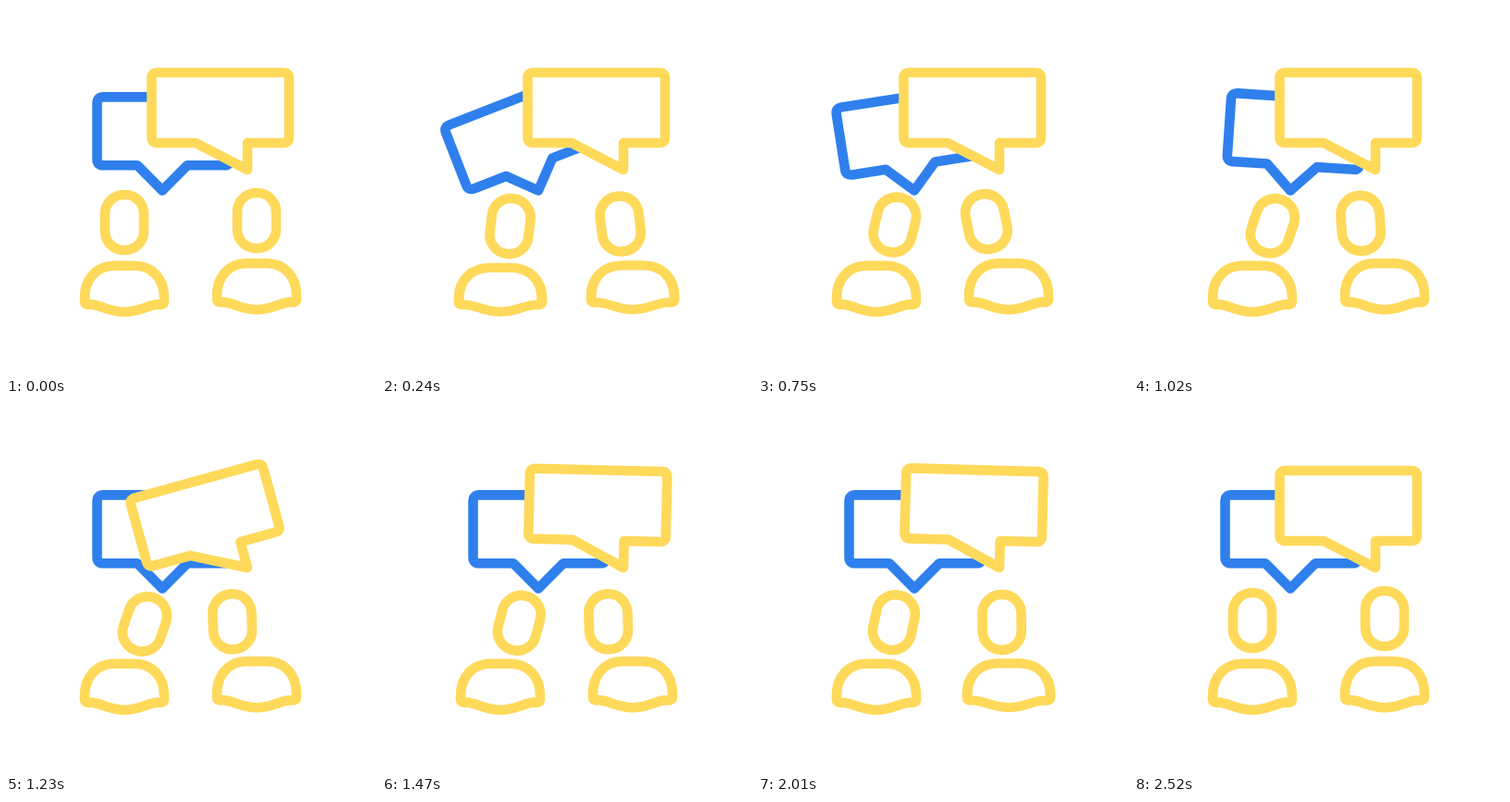
Recreate the animation shown at these times as an HTML page. Size 400x400 px, loop 5550 ms.

```html
<!DOCTYPE html>
<html lang="en">
<head>
<meta charset="utf-8">
<title>Conversation</title>
<style>
  html, body { margin: 0; width: 100%; height: 100%; overflow: hidden; background: #fff; }
  svg { display: block; width: 100%; height: 100%; }
  .line { fill: none; stroke: #ffd95a; stroke-width: 10.6; stroke-linejoin: round; stroke-linecap: round; }
  .filled { fill: #fff; }
  .blue { stroke: #2f80ed; }
</style>
</head>
<body>
<svg viewBox="0 0 400 400">
  <defs>
    <rect id="head" x="-21" y="-30" width="42" height="60" rx="20.5"/>
    <path id="body" d="M-43 -11 V-14 C-43 -35 -30 -49 -11 -49 H11 C30 -49 43 -35 43 -14 V-11 Q43 -6 38 -7 C27 -8 18 1 0 1 C-18 1 -27 -8 -38 -7 Q-43 -6 -43 -11 Z"/>
  </defs>
  <path id="blue" class="line filled blue" d="M105.5 98.4 H235 Q242 98.4 242 105 V166 Q242 172.3 236 172.3 H196 L169 199.5 L142 172.3 H105.5 Q98.5 172.3 98.5 166 V105 Q98.5 98.4 105.5 98.4 Z"/>
  <path id="yellow" class="line filled" d="M163.5 72 H300 Q306 72 306 78 V142 Q306 148 300 148 H261 V177 L205 148 H163.5 Q157.5 148 157.5 142 V78 Q157.5 72 163.5 72 Z"/>
  <use id="leftBody" href="#body" class="line"/>
  <use id="rightBody" href="#body" class="line"/>
  <use id="leftHead" href="#head" class="line"/>
  <use id="rightHead" href="#head" class="line"/>
</svg>
<script>
  const LOOP = 5550, STEP = 30;
  const PEAKS = [0, -21.3, 15, -10, 5, 0];

  const clamp = p => Math.min(1, Math.max(0, p));
  const ease = p => (1 - Math.cos(Math.PI * p)) / 2;
  const ramp = (t, from, to) => ease(clamp((t - from) / (to - from)));
  const bump = (t, from, to) => Math.sin(Math.PI * clamp((t - from) / (to - from))) ** 2;

  const place = (id, transform) =>
    document.getElementById(id).setAttribute("transform", transform);

  // A bubble rocks on the tip of its tail, each swing smaller than the last.
  function rock(id, t, start, beat, x, y) {
    const pos = Math.min(PEAKS.length - 1.001, Math.max(0, (t - start) / beat));
    const n = Math.floor(pos);
    const angle = PEAKS[n] + (PEAKS[n + 1] - PEAKS[n]) * ease(pos - n);
    place(id, `rotate(${angle} ${x} ${y})`);
  }

  // The head sinks as the body is squashed.
  function person(side, squash, bodyX, bodyY, x, y, tilt) {
    const s = 0.045 * squash;
    place(side + "Body", `translate(${bodyX} ${bodyY}) scale(${1 + s} ${1 - s})`);
    place(side + "Head", `translate(${x} ${y + 3 * squash}) rotate(${tilt})`);
  }

  function draw(t) {
    rock("blue", t, 0, 236, 169, 199.5);
    rock("yellow", t, 1064, 257, 261, 177);

    const lean = ramp(t, 0, 450);
    const press = bump(t, 0, 450);

    const left = lean - ramp(t, 1990, 2480);
    const nod = bump(t, 560, 1720);
    person("left", press + bump(t, 1980, 2420), 128, 329.7,
      128 + 19 * left + 3.2 * nod, 234 + 2 * left + 2 * nod, 12 * left + 7.5 * nod);

    const back = 1 - ramp(t, 1700, 2180);
    const right = lean * back;
    const lift = ramp(t, 690, 1150) * back;
    person("right", press + bump(t, 1760, 2260), 271, 327.2,
      271 - 24 * right - 2.3 * lift, 232 + right + 2.3 * lift, -12 * right + 10 * lift);
  }

  const start = performance.now();
  function tick() {
    const t = (performance.now() - start) % LOOP;
    draw(Math.floor(t / STEP) * STEP);
    requestAnimationFrame(tick);
  }
  tick();
</script>
</body>
</html>
```
